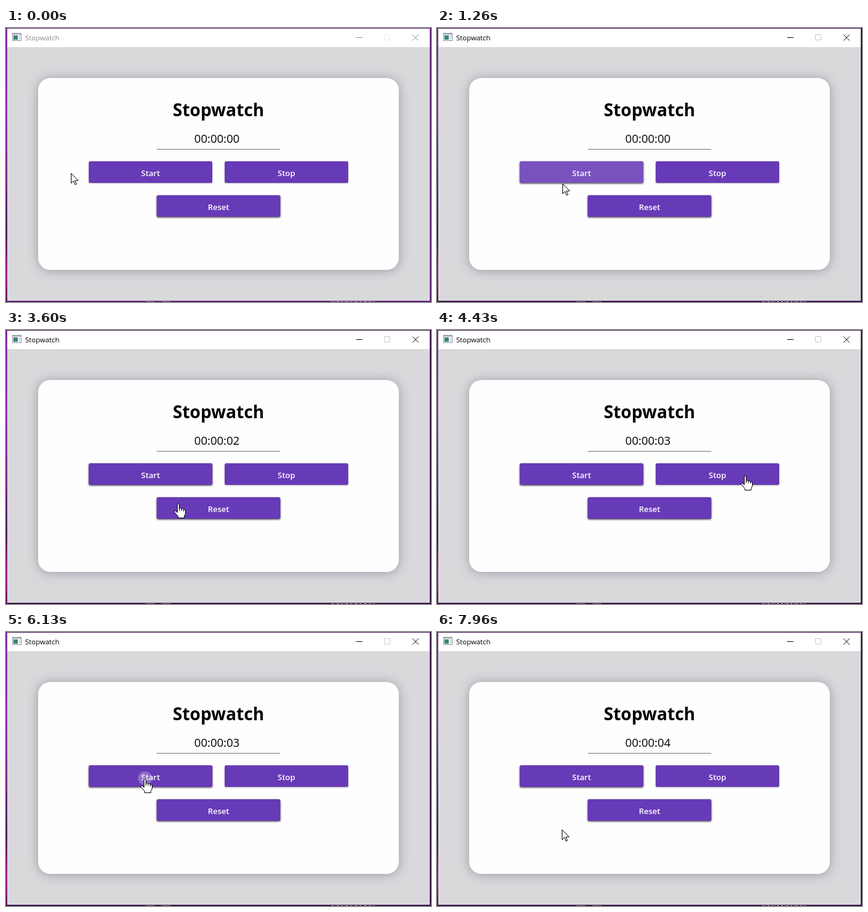
Recreate the animation shown at these times as an HTML page. Size 688 px wide and 444 px high, loop 8 s.

```html
<!DOCTYPE html>
<html lang="en">
<head>
<meta charset="utf-8">
<title>Stopwatch</title>
<style>
  html, body { margin: 0; width: 100%; height: 100%; overflow: hidden; background: #d9d9dc; }
  svg { display: block; width: 688px; height: 444px; font-family: "Open Sans", "Noto Sans", sans-serif; }
  .card { fill: #fefefe; filter: drop-shadow(0 1px 9px rgba(62, 66, 82, .42)); }
  .button rect { fill: #673ab7; filter: drop-shadow(0 1px 1.2px rgba(0, 0, 0, .3)); }
  .button.raised rect { filter: drop-shadow(0 1px 1.6px rgba(0, 0, 0, .8)); }
  .button text { fill: #fff; font-size: 13px; font-weight: 600; }
  .button circle { fill: #fff; }
  .middle { text-anchor: middle; }
  .cursor { fill: #fff; stroke: #000; stroke-linejoin: round; }
  .chrome path { fill: none; stroke: currentColor; }
  .chrome text { fill: currentColor; font-size: 11.4px; }
</style>
</head>
<body>
<svg viewBox="0 0 688 444">
  <defs>
    <linearGradient id="edge" x2="0" y2="1">
      <stop offset="0" stop-color="#7d1f9c"/>
      <stop offset=".3" stop-color="#9328b4"/>
      <stop offset=".75" stop-color="#4a1056"/>
      <stop offset=".9" stop-color="#a3128a"/>
      <stop offset="1" stop-color="#5d0c58"/>
    </linearGradient>
    <clipPath id="buttonShape"><rect width="200" height="35" rx="2.5"/></clipPath>
  </defs>

  <rect id="border" width="688" height="444"/>
  <rect width="2" height="444" fill="url(#edge)"/>
  <rect x="2" y="1" width="684" height="441" fill="#d9d9dc"/>
  <rect x="2" y="1" width="684" height="30" fill="#fff"/>
  <g fill="none" stroke="#c9c4cc">
    <path d="M527 443.5H597" stroke-dasharray="3 2 1 2 4 3"/>
    <path d="M226 443.5H240M252 443.5H266" stroke="#8d8590"/>
  </g>

  <g id="chrome" class="chrome">
    <text x="31" y="20">Stopwatch</text>
    <path d="M567 15.5H577M658 10.5L668 20.5M668 10.5L658 20.5"/>
  </g>
  <path id="maximise" d="M612.5 10.5H621.5V19.5H612.5Z" fill="none"/>
  <rect x="10.5" y="8.5" width="14" height="12" fill="#f5f6f7" stroke="#8b949b"/>
  <path d="M11 10H24" stroke="#b3bbc2" stroke-width="2"/>
  <rect x="12" y="12" width="7" height="7" fill="#36857c"/>
  <path d="M21 13H23M21 15H23M21 17H23" stroke="#b8c1c8"/>

  <rect class="card" x="52" y="81" width="584" height="311" rx="20"/>
  <text class="middle" x="344" y="143" font-size="28" font-weight="700">Stopwatch</text>
  <text id="time" class="middle" x="341.5" y="186" font-size="18.5"></text>
  <path d="M244 196.5H444" stroke="#757575"/>
  <g id="buttons"></g>

  <path id="arrow" class="cursor" d="M.5 .5V16.5L4.3 13L6.9 19L9.1 18L6.5 12.1H11.8Z"/>
  <path id="hand" class="cursor" d="M-1.5 2Q-1.5 .5 0 .5T1.5 2V8Q4.7 6.8 5 9Q8 7.8 8.5 10Q11.5 9 11.5 12V17
    L9.5 20.5V23.5H-.5V21L-6 14.5Q-7.5 12 -4.8 12L-1.5 14.8ZM1.5 8V12M5 9V12.5M8.5 10V13"/>
</svg>

<script>
const DURATION = 8000, WIDTH = 200, HEIGHT = 35;
const START_PRESS = 720, STOP_PRESS = 4600, RESTART_PRESS = 6060;
const TICKS = [1760, 2760, 3760, 7210];

// time, x, y of the pointer's hot spot
const PATH = [
  [0, 105, 235], [100, 105, 235], [560, 220, 228], [950, 220, 228],
  [1700, 172, 300], [2000, 169, 307], [2500, 169, 309], [3230, 169, 309],
  [3800, 360, 262], [4250, 499, 236], [4750, 499, 236], [5000, 385, 258],
  [5230, 253, 253], [5650, 225, 237], [6260, 225, 237], [6560, 215, 269],
  [7050, 202, 320], [8000, 202, 320]
];

const byId = id => document.getElementById(id);
const clamp = v => Math.max(0, Math.min(1, v));

const buttons = [
  { label: "Start", x: 134, y: 216, presses: [START_PRESS, RESTART_PRESS],
    raised: t => t >= START_PRESS && t < STOP_PRESS || t >= RESTART_PRESS },
  { label: "Stop", x: 354, y: 216, presses: [STOP_PRESS],
    raised: t => t >= STOP_PRESS && t < RESTART_PRESS },
  { label: "Reset", x: 244, y: 271, presses: [], raised: () => true }
];

for (const b of buttons) {
  byId("buttons").insertAdjacentHTML("beforeend",
    `<g class="button" transform="translate(${b.x} ${b.y})">
      <rect width="${WIDTH}" height="${HEIGHT}" rx="2.5"/>
      <g clip-path="url(#buttonShape)"><circle/></g>
      <text class="middle" x="100" y="24">${b.label}</text>
    </g>`);
  b.node = byId("buttons").lastElementChild;
  b.ripple = b.node.querySelector("circle");
}

const slope = (i, axis) => (PATH[i + 1][axis] - PATH[i][axis]) / (PATH[i + 1][0] - PATH[i][0]);

// Tangent that never overshoots the neighbouring points
function tangent(i, axis) {
  if (i === 0 || i === PATH.length - 1) return 0;
  const a = slope(i - 1, axis), b = slope(i, axis);
  return a * b <= 0 ? 0 : 2 * a * b / (a + b);
}

function pointerAt(t) {
  const i = Math.max(0, PATH.findIndex(p => p[0] > t) - 1);
  const span = PATH[i + 1][0] - PATH[i][0];
  const u = (t - PATH[i][0]) / span, v = 1 - u;
  return [1, 2].map(axis =>
    PATH[i][axis] * v * v * (1 + 2 * u) + PATH[i + 1][axis] * u * u * (3 - 2 * u) +
    span * u * v * (tangent(i, axis) * v - tangent(i + 1, axis) * u));
}

function drawButton(b, t) {
  b.node.classList.toggle("raised", b.raised(t));
  const press = b.presses.filter(p => p <= t).pop();
  const age = press === undefined ? Infinity : t - press;
  const [x, y] = pointerAt(press ?? 0);
  b.ripple.setAttribute("cx", x - b.x);
  b.ripple.setAttribute("cy", y - b.y);
  b.ripple.setAttribute("r", 200 * clamp(age / 300) ** 2);
  b.ripple.setAttribute("opacity", .26 * clamp((750 - age) / 450));
}

function draw(t) {
  const active = t >= START_PRESS;
  byId("chrome").style.color = active ? "#000" : "#8c8c8c";
  byId("maximise").setAttribute("stroke", active ? "#ccc" : "#e6e6e6");
  byId("border").setAttribute("fill", active ? "#3b1248" : "#5f2378");
  byId("time").textContent = "00:00:0" + TICKS.filter(tick => tick <= t).length;
  buttons.forEach(b => drawButton(b, t));

  const [x, y] = pointerAt(t).map(Math.round);
  const over = buttons.some(b => x >= b.x && x < b.x + WIDTH && y >= b.y && y < b.y + HEIGHT);
  for (const [id, shown] of [["hand", over], ["arrow", !over]]) {
    byId(id).setAttribute("transform", `translate(${x} ${y})`);
    byId(id).style.display = shown ? "" : "none";
  }
}

const began = performance.now();
function frame() {
  draw((performance.now() - began) % DURATION);
  requestAnimationFrame(frame);
}
frame();
</script>
</body>
</html>
```
